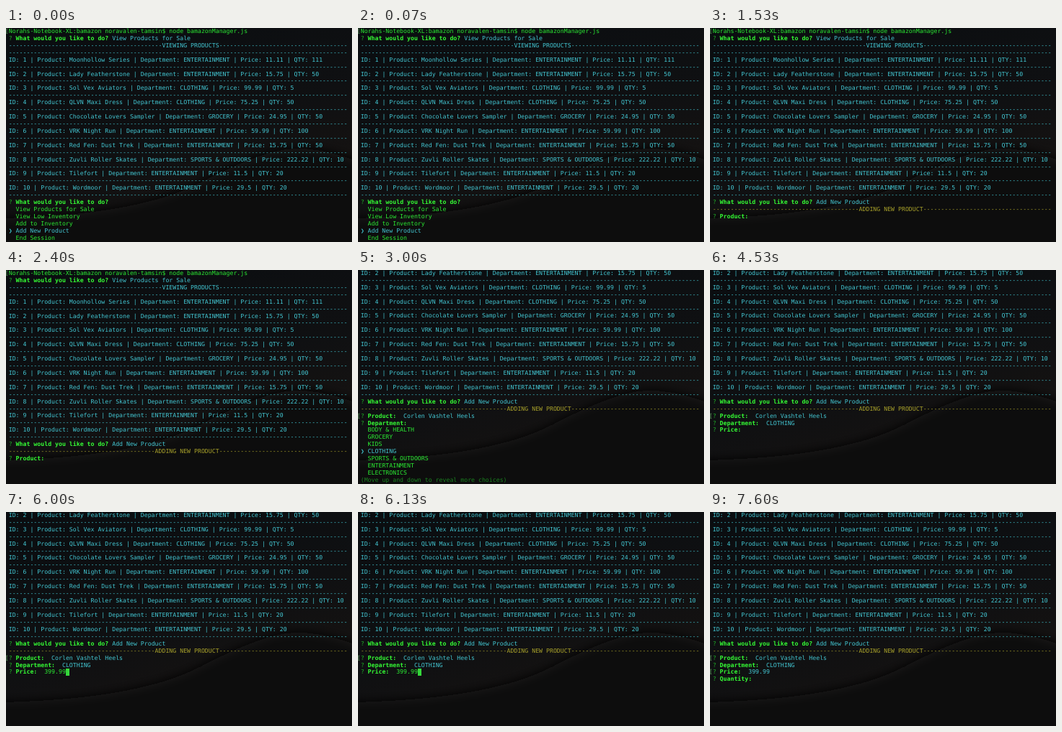
These frames come from a looping animation (480 by 298 pixels, 8 s). An HTML page:

```html
<!DOCTYPE html>
<html lang="en">
<head>
<meta charset="utf-8">
<title>Store manager terminal</title>
<style>
  :root { --line: 9.93px; --green: #2bea33; --cyan: #43c6d2; }
  html, body { margin: 0; width: 100%; height: 100%; overflow: hidden; background: #0a0c0e; }
  #stage { position: relative; width: 480px; height: 298px; overflow: hidden; }
  #desk { position: absolute; inset: 0; }
  #screen {
    position: absolute; left: 3.7px; top: 0;
    font: 8.22px/var(--line) "DejaVu Sans Mono", monospace;
    text-rendering: geometricPrecision; font-variant-ligatures: none;
    white-space: pre; color: var(--green);
    animation: scroll 8s step-end infinite;
  }
  .block { position: absolute; left: 0; top: calc(var(--row) * var(--line)); }
  .block div { position: relative; height: var(--line); }
  b { color: #35fb35; }
  .cyan { color: var(--cyan); }
  .yellow { color: #aaa32b; }
  .dim { color: #20ab28; }
  .hint { color: #1a8220; }
  .mark { position: absolute; left: -1ch; color: #63a866; }
  .pointer { display: inline-block; width: 1ch; height: var(--line); vertical-align: top; }
  .cursor { display: inline-block; width: 1ch; height: var(--line); vertical-align: top; background: #35d83b; }
  .typed { position: absolute; left: 10ch; }

  .menu, .form, .list, .named, .priced, .typed, .done { animation: 8s step-end infinite; }
  .menu { animation-name: menu; }
  .form { animation-name: form; }
  .list { animation-name: list; }
  .named { animation-name: named; }
  .priced { animation-name: priced; }
  .typed { animation-name: typed; }
  .done { animation-name: done; }

  @keyframes scroll { 0% { top: 0; } 37.5%, 100% { top: calc(-6 * var(--line)); } }
  @keyframes menu { 0% { opacity: 1; } 19.125%, 100% { opacity: 0; } }
  @keyframes form { 0% { opacity: 0; } 19.125%, 100% { opacity: 1; } }
  @keyframes named { 0% { opacity: 0; } 37.5%, 100% { opacity: 1; } }
  @keyframes list { 0% { opacity: 0; } 37.5% { opacity: 1; } 56.625%, 100% { opacity: 0; } }
  @keyframes priced { 0% { opacity: 0; } 56.625%, 100% { opacity: 1; } }
  @keyframes typed { 0% { opacity: 0; } 75% { opacity: 1; } 94.125%, 100% { opacity: 0; } }
  @keyframes done { 0% { opacity: 0; } 94.125%, 100% { opacity: 1; } }
</style>
</head>
<body>
<div id="stage">
  <svg id="desk" width="480" height="298">
    <defs>
      <linearGradient id="sky" x1="0" y1="0" x2="0.5" y2="1">
        <stop offset="0" stop-color="#0a0d10"/>
        <stop offset="0.6" stop-color="#0f1012"/>
        <stop offset="1" stop-color="#171311"/>
      </linearGradient>
      <filter id="soft"><feGaussianBlur stdDeviation="7"/></filter>
    </defs>
    <rect width="480" height="298" fill="url(#sky)"/>
    <path d="M-20 265 Q180 262 270 215 T400 168 Q440 166 500 190 V320 H-20Z" fill="#090909" filter="url(#soft)"/>
  </svg>
  <div id="screen"></div>
</div>
<script>
  const WIDTH = 95;
  const screen = document.getElementById('screen');

  const span = (name, text) => `<span class="${name}">${text}</span>`;
  const cyan = text => span('cyan', text);
  const rule = cyan('-'.repeat(WIDTH));
  const ask = label => `${span('dim', '?')} <b>${label}</b>`;
  const item = text => '  ' + text;
  const chosen = text => cyan(span('pointer', '❯') + ' ' + text);
  const mark = span('mark', '[');

  function banner(color, title) {
    const left = 59 - title.length;
    return span(color, '-'.repeat(left) + title + '-'.repeat(WIDTH - 59));
  }

  function block(row, name, lines) {
    const rows = lines.map(line => `<div>${line}</div>`).join('');
    screen.insertAdjacentHTML('beforeend',
      `<div class="block ${name}" style="--row:${row}">${rows}</div>`);
  }

  const products = [
    ['Moonhollow Series', 'ENTERTAINMENT', '11.11', 111],
    ['Lady Featherstone', 'ENTERTAINMENT', '15.75', 50],
    ['Sol Vex Aviators', 'CLOTHING', '99.99', 5],
    ['QLVN Maxi Dress', 'CLOTHING', '75.25', 50],
    ['Chocolate Lovers Sampler', 'GROCERY', '24.95', 50],
    ['VRK Night Run', 'ENTERTAINMENT', '59.99', 100],
    ['Red Fen: Dust Trek', 'ENTERTAINMENT', '15.75', 50],
    ['Zuvli Roller Skates', 'SPORTS &amp; OUTDOORS', '222.22', 10],
    ['Tilefort', 'ENTERTAINMENT', '11.5', 20],
    ['Wordmoor', 'ENTERTAINMENT', '29.5', 20]
  ];
  const question = ask('What would you like to do?');

  block(0, 'log', [
    mark + 'Norahs-Notebook-XL:bamazon noravalen-tamsin$ node bamazonManager.js',
    question + ' ' + cyan('View Products for Sale'),
    banner('cyan', 'VIEWING PRODUCTS'),
    rule,
    ...products.flatMap(([name, department, price, stock], i) => [
      cyan(`ID: ${i + 1} | Product: ${name} | Department: ${department} | Price: ${price} | QTY: ${stock}`),
      rule
    ])
  ]);

  block(24, 'menu', [
    question,
    item('View Products for Sale'),
    item('View Low Inventory'),
    item('Add to Inventory'),
    chosen('Add New Product'),
    item('End Session')
  ]);

  block(24, 'form', [
    question + ' ' + cyan('Add New Product'),
    banner('yellow', 'ADDING NEW PRODUCT'),
    ask('Product:') + span('named', mark + '  ' + cyan('Corlen Vashtel Heels'))
  ]);

  block(27, 'named', [
    ask('Department:') + span('priced', '  ' + cyan('CLOTHING'))
  ]);

  block(28, 'list', [
    item('BODY &amp; HEALTH'),
    item('GROCERY'),
    item('KIDS'),
    chosen('CLOTHING'),
    item('SPORTS &amp; OUTDOORS'),
    item('ENTERTAINMENT'),
    item('ELECTRONICS'),
    span('hint', '(Move up and down to reveal more choices)')
  ]);

  block(28, 'priced', [
    ask('Price:') + span('typed', '399.99' + span('cursor', '')) +
      span('done', mark + '  ' + cyan('399.99'))
  ]);

  block(29, 'done', [ask('Quantity:')]);
</script>
</body>
</html>
```
